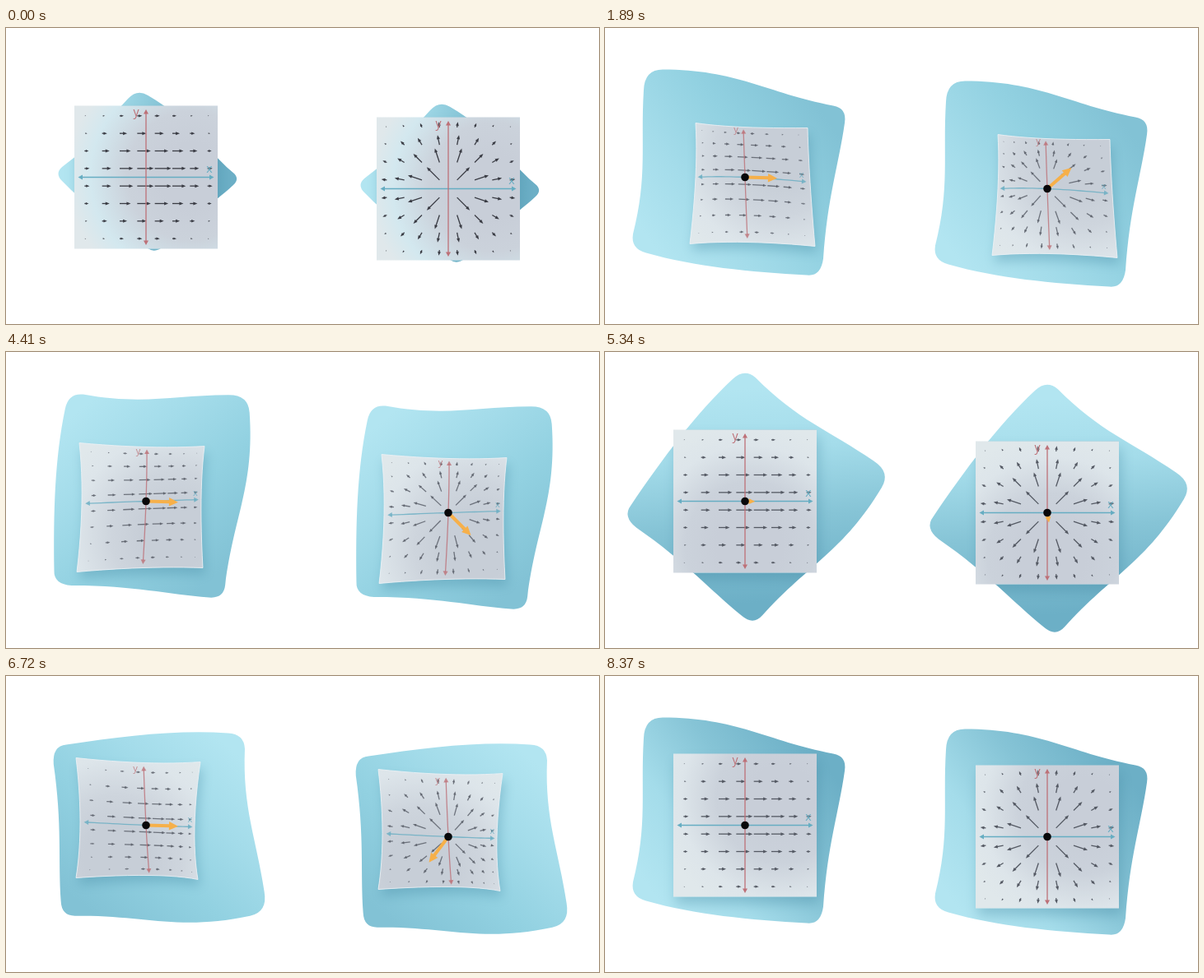
Recreate the animation shown at these times as an HTML page with a canvas. Size 720 by 360 pixels, loop 8400 ms.

```html
<!DOCTYPE html>
<html lang="en">
<head>
<meta charset="utf-8">
<title>Vector fields on a surface</title>
<style>
html, body { margin: 0; width: 100%; height: 100%; overflow: hidden; background: #fff; }
canvas { display: block; }
</style>
</head>
<body>
<canvas id="stage" width="720" height="360"></canvas>
<script>
const ctx = document.getElementById('stage').getContext('2d');
const LOOP = 8400, HALF = 87, DEG = Math.PI / 180;

// Each stop: sheet wraps at `on`, unwraps at `off`, surface starts turning at `turn`.
// `grid` holds a 3x3 net of points for the draped sheet, row by row.
const stops = [
  { on: 900, off: 2100, turn: 2550, dur: 960, rot: 0,
    grid: [[-60, -66], [-2, -61], [76, -60], [-60, 0], [0, 0], [79, 6], [-67, 81], [3, 79], [85, 84]] },
  { on: 3500, off: 4500, turn: 4845, dur: 1100, rot: 86,
    grid: [[-81, -71], [1, -66], [71, -67], [-78, 3], [0, 0], [67, -2], [-84, 86], [-4, 81], [69, 81]] },
  { on: 5950, off: 7150, turn: 7590, dur: 780, rot: 168,
    grid: [[-85, -82], [-3, -76], [66, -77], [-80, -4], [0, 0], [59, 2], [-85, 64], [4, 61], [63, 66]] }
];

const clamp = x => Math.max(0, Math.min(1, x));
const ramp = (t, start, dur) => { const u = clamp((t - start) / dur); return u * u * (3 - 2 * u); };
const mix = (a, b, k) => a + (b - a) * k;
const blend = (a, b, k) => `rgb(${a.map((v, i) => Math.round(mix(v, b[i], k)))})`;

function stateAt(t) {
  const intro = ramp(t, 0, 870);
  const stop = stops[t < 3400 ? 0 : t < 5900 ? 1 : 2];
  const next = stops[(stops.indexOf(stop) + 1) % 3];
  const turned = mix(stop.rot, next.rot, ramp(t, stop.turn, stop.dur));
  return {
    intro,
    grid: stop.grid,
    rot: (turned + 35 * (1 - intro)) * DEG,
    wrap: ramp(t, stop.on, 600) * (1 - ramp(t, stop.off, 600)),
    arrow: ramp(t, stop.on + 150, 500) * (1 - ramp(t, stop.turn, 790)),
    dot: ramp(t, 500, 300)
  };
}

// Flat sheet position blended with its draped position.
function mapper({ grid, wrap }) {
  const basis = q => [q * (q - 1) / 2, 1 - q * q, q * (q + 1) / 2];
  return (x, y) => {
    const bx = basis(x / HALF), by = basis(y / HALF);
    let px = 0, py = 0;
    grid.forEach(([gx, gy], i) => {
      const k = bx[i % 3] * by[i / 3 | 0];
      px += gx * k;
      py += gy * k;
    });
    return [mix(x, px, wrap), mix(y, py, wrap)];
  };
}

function trace(points) {
  ctx.beginPath();
  points.forEach(p => ctx.lineTo(...p));
}

function head([x, y], angle, len, width) {
  const c = Math.cos(angle), s = Math.sin(angle), w = width / 2;
  trace([[x, y], [x - len * c - w * s, y - len * s + w * c], [x - len * c + w * s, y - len * s - w * c]]);
  ctx.fill();
}

function surfacePath() {
  ctx.beginPath();
  ctx.moveTo(-123, -106);
  ctx.quadraticCurveTo(-122, -131, -100, -131);
  ctx.bezierCurveTo(-10, -131, 25, -103, 107, -87);
  ctx.quadraticCurveTo(124, -84, 121, -66);
  ctx.bezierCurveTo(114, -16, 100, 24, 95, 99);
  ctx.quadraticCurveTo(92, 121, 75, 119);
  ctx.bezierCurveTo(5, 115, -60, 109, -120, 92);
  ctx.quadraticCurveTo(-139, 87, -136, 69);
  ctx.bezierCurveTo(-118, -1, -127, -41, -123, -106);
  ctx.closePath();
}

function drawSurface(s, outline) {
  ctx.save();
  // The turning point lies slightly off the sheet's centre.
  const px = .5, py = 1.5;
  ctx.translate(px + 6 * (1 - s.intro), py);
  ctx.scale(mix(.72, 1, s.intro), mix(.61, 1, s.intro));
  ctx.rotate(s.rot);
  ctx.translate(-px, -py);
  surfacePath();
  const g = ctx.createLinearGradient(-110, 85, 100, -70);
  g.addColorStop(0, '#b2e5f1');
  g.addColorStop(.3, '#a4dcea');
  g.addColorStop(.62, blend([134, 196, 214], [146, 209, 225], s.wrap));
  g.addColorStop(1, blend([108, 175, 198], [130, 194, 213], s.wrap));
  ctx.fillStyle = g;
  ctx.fill();
  ctx.clip();
  ctx.setTransform(1, 0, 0, 1, s.x, s.y);
  ctx.shadowColor = 'rgba(50,120,148,.3)';
  ctx.shadowBlur = 14;
  ctx.shadowOffsetX = 3;
  ctx.shadowOffsetY = 8;
  trace(outline);
  ctx.fill();
  ctx.restore();
}

function drawSheet(s, outline) {
  const c = Math.cos(s.rot - .65), n = Math.sin(s.rot - .65);
  const g = ctx.createRadialGradient(55 * c, 55 * n, 40, 55 * c, 55 * n, 150);
  g.addColorStop(0, blend([200, 206, 216], [199, 206, 215], s.wrap));
  g.addColorStop(.35, blend([203, 210, 219], [206, 213, 221], s.wrap));
  g.addColorStop(.75, blend([211, 232, 239], [221, 229, 234], s.intro));
  g.addColorStop(1, '#e0e8eb');
  trace(outline);
  ctx.fillStyle = g;
  ctx.fill();
  if (s.wrap > 0) {
    ctx.strokeStyle = `rgba(240,243,247,${.8 * s.wrap})`;
    ctx.lineWidth = 1;
    ctx.closePath();
    ctx.stroke();
  }
}

function drawAxis(map, at, color) {
  const pts = [];
  for (let i = -10; i <= 10; i++) pts.push(map(...at(i * 7.8)));
  ctx.strokeStyle = ctx.fillStyle = color;
  ctx.lineWidth = 1.3;
  trace(pts);
  ctx.stroke();
  for (const d of [-1, 1]) {
    const a = map(...at(d * 76)), b = map(...at(d * 82.5));
    head(b, Math.atan2(b[1] - a[1], b[0] - a[0]), 5.5, 6);
  }
}

function drawField(s, map, radial) {
  ctx.strokeStyle = ctx.fillStyle = blend([58, 60, 68], [84, 89, 99], s.intro);
  ctx.lineWidth = 1.3;
  const step = 21.33;
  for (let i = -3.5; i < 4; i++) for (let j = -3.5; j < 4; j++) {
    const x = i * step, y = j * step;
    const len = (radial ? 23 : 21) * Math.exp(-(x * x + y * y) / 4600);
    const dir = radial ? Math.atan2(y, x) : 0;
    const a = map(x, y), b = map(x + len * Math.cos(dir), y + len * Math.sin(dir));
    const size = Math.min(5, Math.max(.8, len * .7)) * (1 - .15 * s.wrap);
    const angle = Math.atan2(b[1] - a[1], b[0] - a[0]);
    if (len > 4) {
      trace([a, [b[0] - 3 * Math.cos(angle), b[1] - 3 * Math.sin(angle)]]);
      ctx.stroke();
    }
    head(b, angle, size, size * .8);
  }
}

function label(text, pos, color, wrap) {
  ctx.fillStyle = color;
  ctx.font = `${mix(14, 11, wrap)}px "Open Sans", "Noto Sans", sans-serif`;
  ctx.textAlign = 'center';
  ctx.textBaseline = 'alphabetic';
  ctx.fillText(text, ...pos);
}

function drawMarker(s, radial) {
  const len = 39 * s.arrow;
  if (len > 1) {
    const dir = radial ? s.rot - 41 * DEG : .03;
    const c = Math.cos(dir), n = Math.sin(dir), tip = Math.min(11, len * .6);
    ctx.strokeStyle = ctx.fillStyle = '#f6b04a';
    ctx.lineWidth = Math.min(4, len / 3);
    trace([[0, 0], [(len - tip + 1) * c, (len - tip + 1) * n]]);
    ctx.stroke();
    head([len * c, len * n], dir, tip, tip * .95);
  }
  ctx.fillStyle = '#08080a';
  ctx.beginPath();
  ctx.arc(0, 0, 4.8 * s.dot, 0, 2 * Math.PI);
  ctx.fill();
}

function drawPanel(base, x, y, radial) {
  const s = { ...base, x, y }, map = mapper(s), outline = [];
  const sides = [q => [q, -HALF], q => [HALF, q], q => [-q, HALF], q => [-HALF, -q]];
  for (const side of sides)
    for (let i = -6; i < 6; i++) outline.push(map(...side(i * HALF / 6)));

  ctx.setTransform(1, 0, 0, 1, x, y);
  drawSurface(s, outline);
  drawSheet(s, outline);
  ctx.globalAlpha = 1 - .2 * s.wrap;
  drawField(s, map, radial);
  drawAxis(map, q => [q, 0], '#66adc2');
  drawAxis(map, q => [0, q], '#bd7077');
  label('x', map(77, -6), '#66adc2', s.wrap);
  label('y', map(-12, -75), '#bd7077', s.wrap);
  ctx.globalAlpha = 1;
  drawMarker(s, radial);
}

function frame(now) {
  const s = stateAt(now % LOOP);
  ctx.setTransform(1, 0, 0, 1, 0, 0);
  ctx.fillStyle = '#fff';
  ctx.fillRect(0, 0, 720, 360);
  drawPanel(s, 170, 181.5, false);
  drawPanel(s, 537, 195.5, true);
  requestAnimationFrame(frame);
}
requestAnimationFrame(frame);
</script>
</body>
</html>
```
